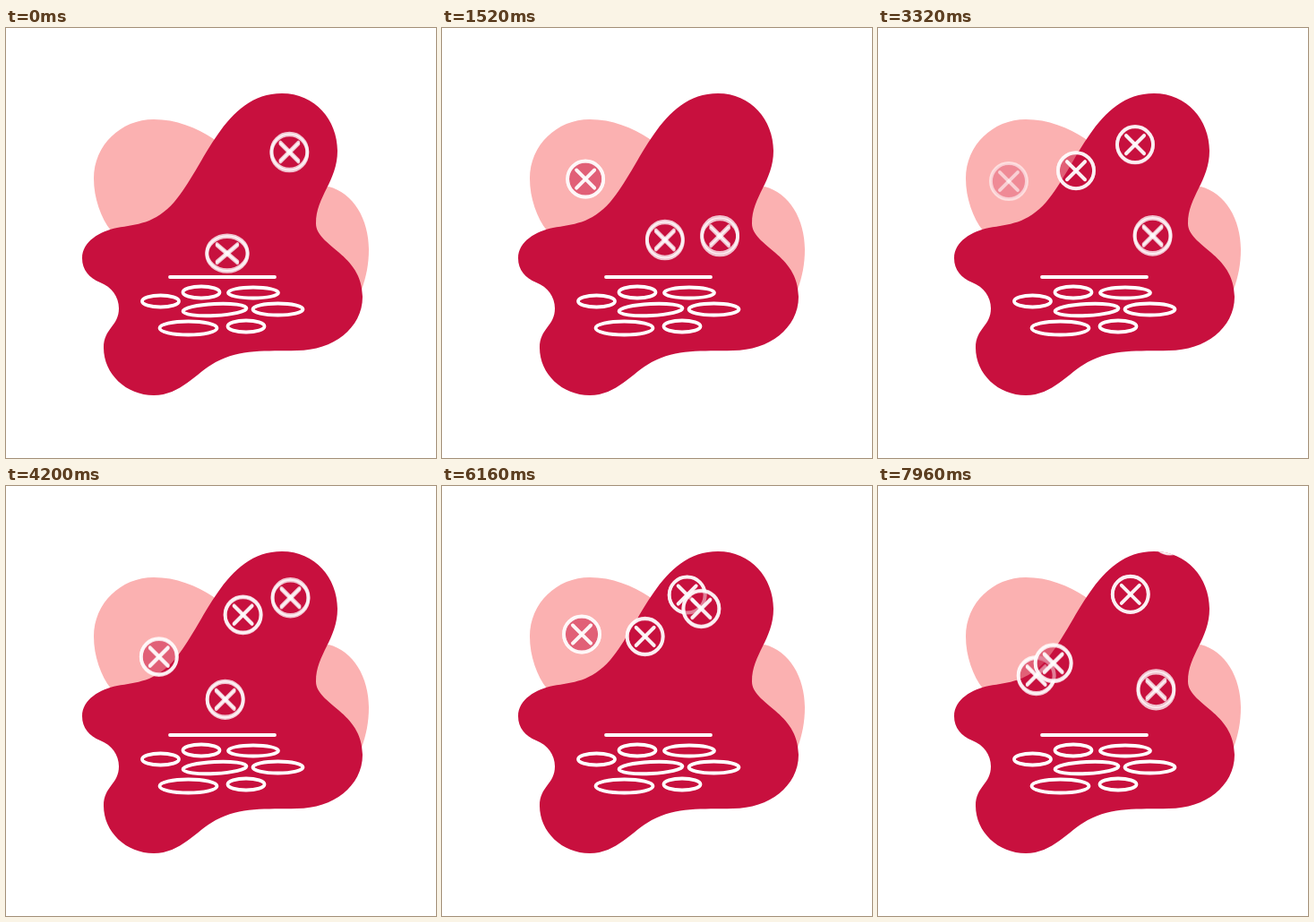
An HTML page with a canvas that plays this animation: 480x480 px, repeating every 8000 ms.

```html
<!DOCTYPE html>
<html lang="en">
<head>
<meta charset="utf-8">
<title>Bouncing coins</title>
<style>
  html, body { margin: 0; height: 100%; overflow: hidden; background: #fff; }
  canvas { display: block; width: 480px; height: 480px; }
</style>
</head>
<body>
<canvas id="stage"></canvas>
<script>
const RED = '#c8103e', PINK = '#fbb1b1';
const LOOP = 8, FLOOR = 252, GRAVITY = 630;

const canvas = document.getElementById('stage');
const ctx = canvas.getContext('2d');
const ratio = window.devicePixelRatio || 1;
canvas.width = canvas.height = 480 * ratio;

const redBlob = new Path2D(`M308 73 C345 73 370 103 370 137 C370 171 346 188 346 218
  C346 244 398 252 398 300 C398 335 365 360 325 360 C290 361 262 358 234 373
  C212 385 195 410 165 410 C134 410 109 386 109 357 C109 335 126 333 126 313
  C126 300 118 289 105 284 C93 279 85 270 85 257 C85 238 105 227 124 223
  C146 219 166 219 188 194 C222 155 243 73 308 73Z`);
const pinkBlob = new Path2D(`M165 102 C190 102 212 111 232 124 L300 200 L360 177
  C388 184 405 214 405 247 C405 264 402 278 397 292 L300 300 L117 226
  C106 212 98 190 98 168 C98 131 128 102 165 102Z`);
const bothBlobs = new Path2D(redBlob);
bothBlobs.addPath(pinkBlob);

// Every coin drops in, then hops left in equal steps; only its first landing time differs
const firstLandings = [-1.3, .26, 1.56, 2.86, 3.27, 4.5, 5.42, 5.75, 7.39, 8.01, 8.55];
const FIRST_X = 309, STEP = 62;
const hopTimes = [1.65, 1.3, 1.1, 1.05];

const clamp = v => Math.max(0, Math.min(1, v));

function coinAt(landing, t) {
  let start = landing - hopTimes[0];
  if (t < start + hopTimes[0] / 2) return null;
  for (const [hop, span] of hopTimes.entries()) {
    const age = t - start, part = age / span;
    if (part < 1) {
      const last = hop === hopTimes.length - 1;
      return {
        x: FIRST_X - STEP * (hop - 1 + part) + (hop ? 0 : (1 - part) * -15),
        y: FLOOR - GRAVITY / 2 * age * (span - age),
        speed: GRAVITY * (age - span / 2),
        alpha: last ? 1 - clamp((part - .5) / .25) : 1
      };
    }
    start += span;
  }
  return null;
}

function strokeEllipse(x, y, rx, ry, turn = 0) {
  ctx.beginPath();
  ctx.ellipse(x, y, rx, ry, turn, 0, 2 * Math.PI);
  ctx.stroke();
}

function strokeLine(x1, y1, x2, y2) {
  ctx.beginPath();
  ctx.moveTo(x1, y1);
  ctx.lineTo(x2, y2);
  ctx.stroke();
}

function drawCoin({ x, y, speed, alpha }) {
  // Wide on landing, round higher up
  const squash = 1 - clamp((FLOOR - y) / 14);
  const rx = 20 * (1 + .14 * squash), ry = 20 * (1 - .03 * squash);
  const ax = rx * .5, ay = ry * .5;

  ctx.globalAlpha = alpha * .5;
  ctx.fillStyle = RED;
  ctx.beginPath();
  ctx.ellipse(x, y, rx, ry, 0, 0, 2 * Math.PI);
  ctx.fill();

  ctx.globalAlpha = alpha * .75;
  for (const side of [-1, 1]) {
    const cy = y + side * speed * .0025;
    strokeEllipse(x, cy, rx, ry);
    strokeLine(x - ax, cy - ay, x + ax, cy + ay);
    strokeLine(x + ax, cy - ay, x - ax, cy + ay);
  }
}

function drawScene() {
  ctx.fillStyle = '#fff';
  ctx.fillRect(0, 0, 480, 480);
  ctx.fillStyle = PINK;
  ctx.fill(pinkBlob);
  ctx.fillStyle = RED;
  ctx.fill(redBlob);

  ctx.strokeStyle = '#fff';
  ctx.lineWidth = 3.8;
  ctx.lineCap = 'round';
  strokeLine(183, 278, 300, 278);
  strokeEllipse(218, 295, 20.5, 6.5);
  strokeEllipse(276, 295.5, 28, 6);
  strokeEllipse(172.5, 305, 20.5, 6.5);
  strokeEllipse(233, 314.5, 35.5, 6.5, -.05);
  strokeEllipse(303.5, 314, 28, 6.5);
  strokeEllipse(203.5, 335, 32, 7.5);
  strokeEllipse(268, 333, 20.5, 6.5);
}

function frame(now) {
  const t = now / 1000 % LOOP;
  ctx.setTransform(ratio, 0, 0, ratio, 0, 0);
  drawScene();
  ctx.save();
  ctx.clip(bothBlobs);
  for (const landing of firstLandings) {
    const coin = coinAt(landing, t);
    if (coin) drawCoin(coin);
  }
  ctx.restore();
  requestAnimationFrame(frame);
}
frame(0);
</script>
</body>
</html>
```
